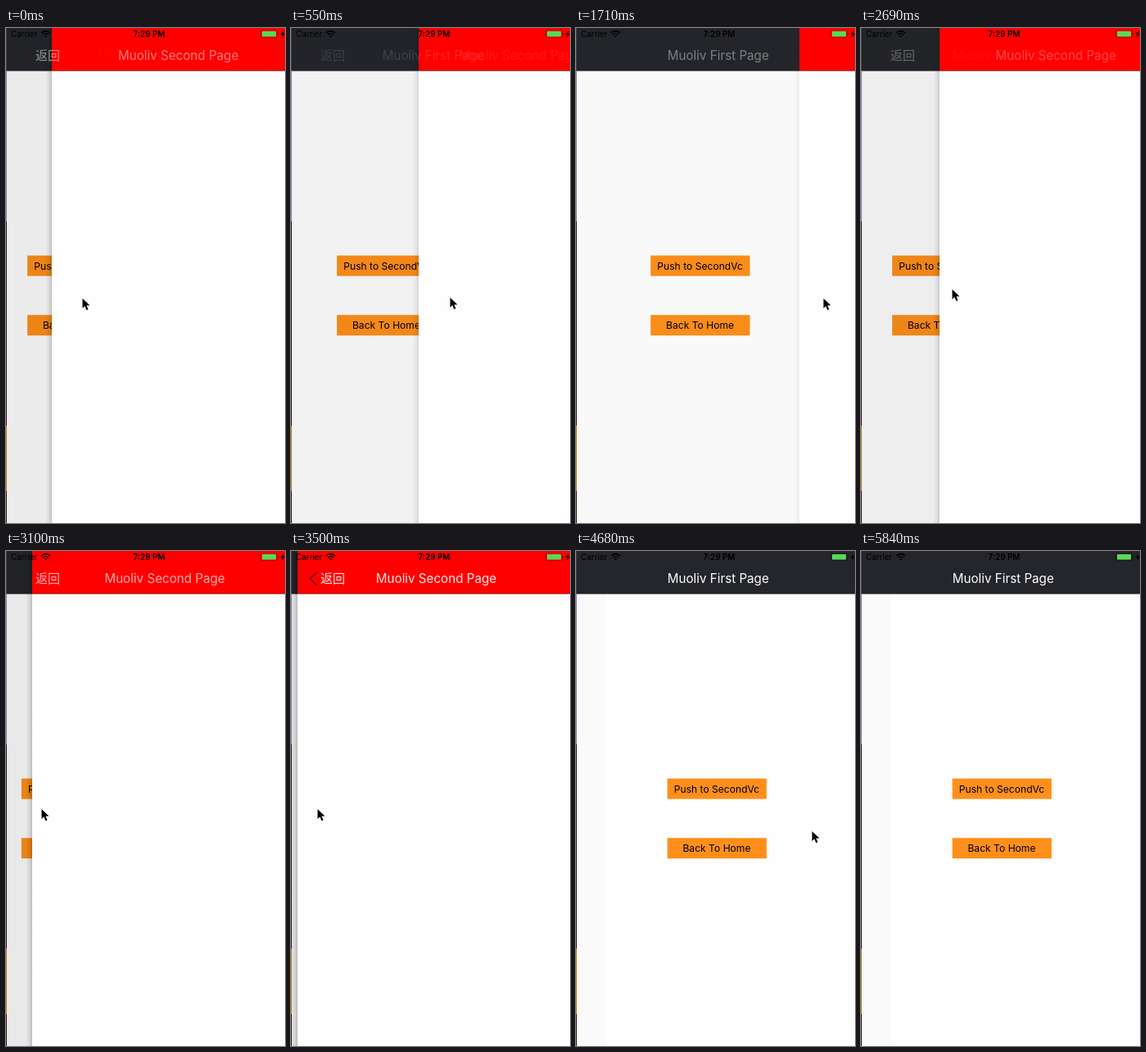
These frames come from a looping animation (341 by 604 pixels, 5940 ms). An HTML page:

```html
<!DOCTYPE html>
<html lang="en">
<head>
<meta charset="utf-8">
<title>Swipe back</title>
<style>
  html, body { margin: 0; width: 100%; height: 100%; overflow: hidden; background: #fff; }
  svg { display: block; width: 341px; height: 604px; }
  text { font-family: Inter, Roboto, sans-serif; }
  .title { font-size: 15.2px; fill: #fff; text-anchor: middle; }
  .label { font-size: 12.1px; fill: #000; text-anchor: middle; }
  .back { font: 15px "Noto Sans CJK SC", "Noto Sans CJK", sans-serif; fill: #fff; }
  .status { font-size: 9.9px; fill: #000; }
</style>
</head>
<body>
<svg viewBox="0 0 341 604">
  <defs>
    <linearGradient id="edge">
      <stop offset="0" stop-opacity="0"/>
      <stop offset=".5" stop-opacity=".35"/>
      <stop offset="1" stop-opacity="1"/>
    </linearGradient>
  </defs>

  <rect width="341" height="604" fill="#fefefe"/>
  <rect id="strip" y="52" width="37" height="552"/>
  <g id="buttons">
    <rect y="277.6" width="121.3" height="25" fill="#ff8f1a"/>
    <rect y="350.2" width="121.3" height="25" fill="#ff8f1a"/>
    <text class="label" x="60.4" y="294.5">Push to SecondVc</text>
    <text class="label" x="60.4" y="367.3">Back To Home</text>
  </g>
  <rect width="341" height="52" fill="#25262b"/>
  <rect y="51.5" width="341" height="1" fill="#18191d"/>
  <rect id="dim" width="341" height="604"/>

  <rect id="shadow" width="8" height="604" fill="url(#edge)"/>
  <g id="second">
    <rect id="page" width="341" height="604"/>
    <rect width="341" height="52" fill="#f00"/>
    <rect y="51.5" width="341" height="1" fill="#a00000"/>
  </g>

  <text id="title1" class="title" x="173.8" y="39">Muoliv First Page</text>
  <text id="title2" class="title" y="39">Muoliv Second Page</text>
  <g id="back">
    <path d="M32 26L23 34L32 42" fill="none" stroke="#40161a" stroke-width="1.3"/>
    <text class="back" x="36" y="39.2">返回</text>
  </g>

  <g>
    <text class="status" x="6" y="11">Carrier</text>
    <g fill="none" stroke="#000" stroke-width="1.6">
      <path d="M43 6a7.6 7.6 0 0 1 11 0M45 8.2a5 5 0 0 1 7 0"/>
      <path d="M48.5 11.5l-1.6-1.8a2.4 2.4 0 0 1 3.2 0z" fill="#000" stroke="none"/>
    </g>
    <text class="status" x="175" y="11" text-anchor="middle" font-weight="600">7:29 PM</text>
    <rect x="311.5" y="3" width="20" height="8.5" rx="1.5" fill="none" stroke="#000" stroke-opacity=".35" stroke-width=".8"/>
    <rect x="313" y="4" width="17" height="6.5" rx=".8" fill="#58d957"/>
    <path d="M332.4 5.7a1.6 1.6 0 0 1 0 3z" fill-opacity=".5"/>
    <path d="M339.6 3.5L335.5 8h2.5l-.8 3.5L341 7h-2.2z"/>
  </g>

  <g>
    <rect width="1" height="52" fill="#3c3f48"/>
    <rect y="52" width="1" height="184" fill="#7c8ba3"/>
    <rect y="236" width="1" height="249" fill="#2c2026"/>
    <rect y="485" width="1" height="80" fill="#c28212"/>
    <rect y="565" width="1" height="39" fill="#33240f"/>
  </g>

  <path id="cursor" d="M.5 1v12l2.8-2.7 2.1 4.9 2.1-.9-2.1-4.7h4.1z" stroke="#fff" stroke-width="1.6" paint-order="stroke"/>
</svg>
<script>
const LOOP = 5940, W = 341, STEP = 57;

const easeIn = n => u => u ** n;
const easeOut = n => u => 1 - (1 - u) ** n;
const linear = easeIn(1);

// Each stroke carries the page edge and the cursor to a new place
const rest = { edge: 56, cx: 93, cy: 329 };
const strokes = [
  { start: 0, end: 230, ease: linear, edge: 106, cx: 147, cy: 328 },
  { start: 430, end: 1830, ease: Math.sqrt, edge: 282, cx: 311, cy: 329 },
  { start: 2060, end: 3270, ease: easeOut(1.72), edge: 22, cx: 32, cy: 313 },
  { start: 3320, end: 3500, ease: linear, edge: 8, cx: 32, cy: 314 },
  { start: 3650, end: 4240, ease: easeIn(0.865), edge: 168, cx: 212, cy: 310 },
  { start: 4290, end: 4530, ease: easeOut(2), edge: W, cx: 288, cy: 341 },
  { start: 4680, end: 4980, ease: linear, edge: W, cx: 334, cy: 606 }
];

const el = id => document.getElementById(id);
const set = (id, attrs) => {
  for (const name in attrs) el(id).setAttribute(name, attrs[name]);
};
const move = (id, x, y = 0) => set(id, { transform: `translate(${x} ${y})` });
const grey = v => `rgb(${v},${v},${v})`;
const mix = (a, b, f) => a + (b - a) * f;

function pose(t) {
  let now = rest;
  for (const s of strokes) {
    if (t < s.start) break;
    const held = t < s.end ? Math.floor((t - s.start) / STEP) * STEP : s.end - s.start;
    const f = s.ease(held / (s.end - s.start));
    now = {
      edge: mix(now.edge, s.edge, f),
      cx: mix(now.cx, s.cx, f),
      cy: mix(now.cy, s.cy, f)
    };
  }
  return now;
}

function draw(t) {
  const { edge, cx, cy } = pose(t);
  const x = Math.round(edge), p = x / W, left = 1 - p;
  const shade = Math.round(254 * (1 - 0.09 * left));

  set("strip", { fill: shade > 250 ? "#fafafa" : "#fefefe" });
  move("buttons", 111.6 - 0.3 * (W - x));
  set("dim", { opacity: 0.09 * left });
  set("shadow", { x: x - 8, opacity: 0.21 * left });
  move("second", x);
  // Nearly equal tones merge into one
  set("page", { fill: shade > 249 ? grey(shade) : "#fefefe" });

  set("title1", { opacity: 0.6 * p ** 2 + 0.4 * p ** 12 });
  set("title2", { x: 172 + 0.69 * x, opacity: left ** 4 });
  set("back", { opacity: left ** 3.6 });
  move("cursor", Math.round(cx), Math.round(cy));
}

function tick() {
  draw(performance.now() % LOOP);
  requestAnimationFrame(tick);
}
tick();
</script>
</body>
</html>
```
